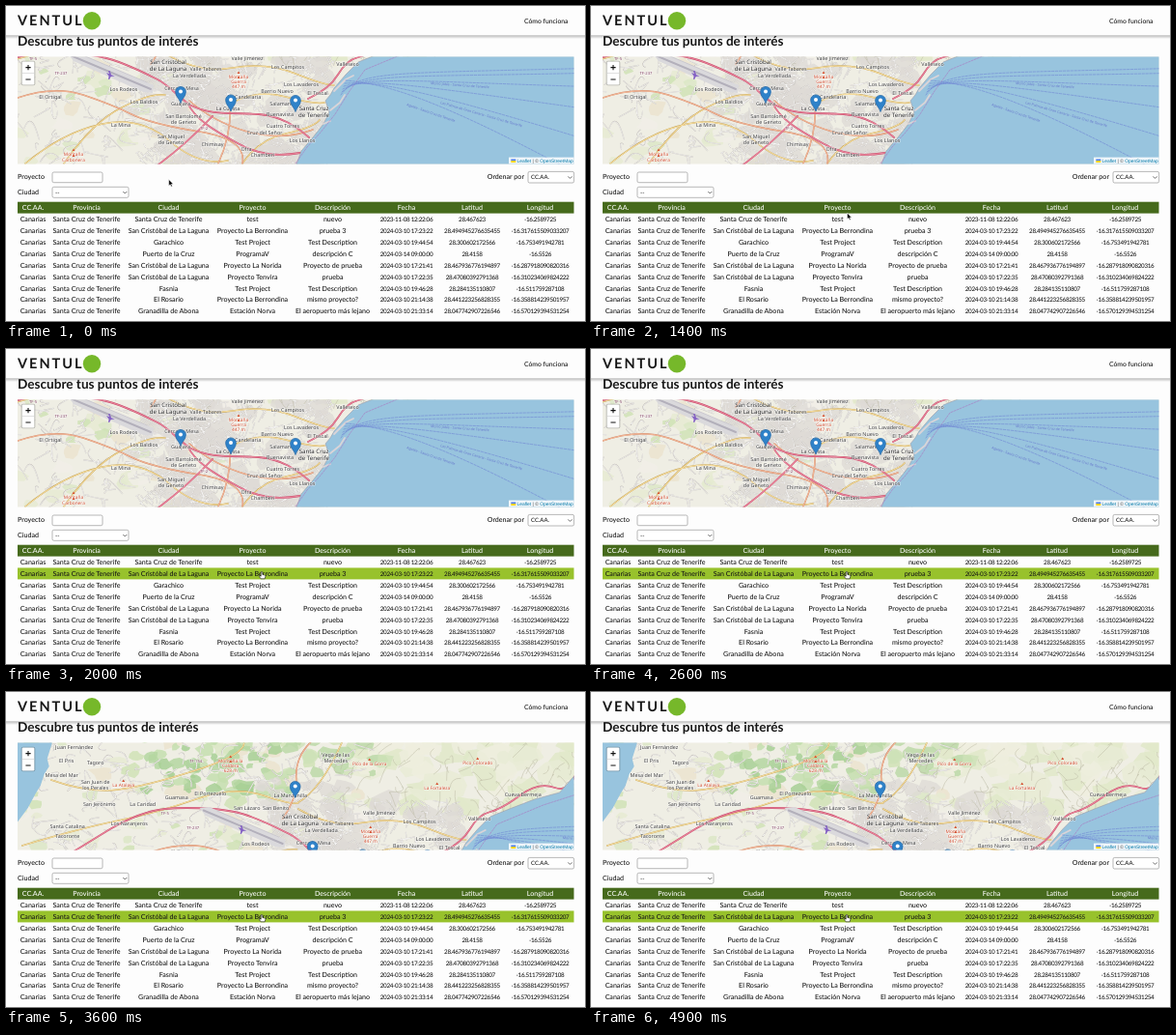
Animation of 600x326 px, one loop 5000 ms. Source, as an HTML page:

```html
<!DOCTYPE html>
<html lang="es">
<head>
<meta charset="utf-8">
<title>Puntos de interés</title>
<style>
html, body { margin: 0; width: 100%; height: 100%; overflow: hidden; background: #fdfdfd; }
svg { display: block; width: 600px; height: 326px; font: 500 7.1px Lato, sans-serif; fill: #161616; text-rendering: geometricPrecision; }
.mid { text-anchor: middle; }
.num { font-size: 6.3px; letter-spacing: -.32px; }
.place { font: 400 5.4px "Noto Sans", sans-serif; text-anchor: middle; fill: #3c3c3c; stroke: #fff; stroke-width: 1.1px; stroke-opacity: .65; paint-order: stroke; }
.town { font-size: 6.1px; fill: #222; }
.peak { font-size: 4.8px; fill: #cf4a2c; }
.ref { font-size: 4.2px; fill: #804060; }
.ferry { font: 3.6px "Noto Sans", sans-serif; fill: #6676cc; }
.line { fill: none; stroke-linecap: round; stroke-linejoin: round; }
.box { fill: #fff; stroke: #888; stroke-width: .6; }
.chev { fill: none; stroke: #333; stroke-width: .7; }
</style>
</head>
<body>
<svg viewBox="0 0 600 326">
  <defs>
    <clipPath id="frame"><rect x="12" y="52.5" width="576.5" height="111"/></clipPath>
    <linearGradient id="shade" x2="0" y2="1">
      <stop stop-color="#000" stop-opacity=".3"/><stop offset="1" stop-color="#000" stop-opacity="0"/>
    </linearGradient>
    <g id="pin">
      <path d="M0 9.5C-1.2 5-5.4 2.6-5.4-2.2A5.4 5.4 0 0 1 5.4-2.2C5.4 2.6 1.2 5 0 9.5Z" fill="#2f82c9" stroke="#2468a5" stroke-width=".7"/>
      <circle cy="-2.4" r="2" fill="#fff"/>
    </g>
  </defs>

  <text x="12" y="41.3" font-size="13.6" font-weight="700">Descubre tus puntos de interés</text>
  <rect y="30" width="600" height="4" fill="url(#shade)"/>
  <rect width="600" height="30.3" fill="#fdfdfd"/>
  <text x="12" y="20.4" font-size="14.5" font-weight="700" letter-spacing="2">VENTUL</text>
  <circle cx="89" cy="15.3" r="9.2" fill="#76b82a"/>
  <text x="537" y="17.6" font-size="6.8">Cómo funciona</text>

  <g clip-path="url(#frame)">
    <g id="map"></g>
    <rect x="15.7" y="56.7" width="14.6" height="25.6" rx="2" fill="#000" opacity=".25"/>
    <rect x="16.6" y="57.6" width="12.8" height="23.8" rx="1.2" fill="#fff"/>
    <path d="M16.6 69.5h12.8" stroke="#ccc" stroke-width=".6"/>
    <path d="M20.4 63.6h5.2M23 61v5.2M20.4 76h5.2" stroke="#111" stroke-width="1.1"/>
    <rect x="521" y="156.6" width="68" height="7" fill="#fff" opacity=".85"/>
    <path d="M523.3 158.6h5v1.7h-5z" fill="#4c7be1"/><path d="M523.3 160.3h5v1.7h-5z" fill="#ffd500"/>
    <text y="162" font-size="4.9" font-family="Liberation Sans, sans-serif" fill="#0078a8"><tspan x="529.5">Leaflet</tspan><tspan fill="#444"> | © </tspan><tspan>OpenStreetMap</tspan></text>
  </g>

  <text x="12" y="179.4">Proyecto</text>
  <rect class="box" x="48" y="172" width="52" height="10.7" rx="1.6"/>
  <text x="12" y="195">Ciudad</text>
  <rect class="box" x="48" y="187.3" width="79" height="11" rx="1.6"/>
  <text x="51" y="194.8" font-size="6">--</text>
  <path class="chev" d="M121.3 192l2 2 2-2"/>
  <text x="537" y="179.4" text-anchor="end">Ordenar por</text>
  <rect class="box" x="541" y="171.4" width="47.6" height="11.6" rx="1.6"/>
  <text x="544" y="179.4" font-size="6">CC.AA.</text>
  <path class="chev" d="M582.5 176.4l2 2 2-2"/>

  <rect id="hover" x="12" width="576.5" height="11.95" fill="#98c22c"/>
  <rect x="12" y="202.7" width="576.5" height="11.9" fill="#466a1c"/>
  <g id="table" class="mid"></g>

  <path id="arrow" d="M0 0V6.4L1.5 5.1 2.5 7.3 3.6 6.8 2.6 4.7H4.6Z" fill="#000" stroke="#fff" stroke-width=".5"/>
  <path id="hand" d="M-.8 0Q0-1 .8 0V2.6L3.4 3.3Q4 3.6 3.8 4.6L3.2 7H-.9L-2.8 4.4Q-2.6 3.4-.8 4.4Z" fill="#fff" stroke="#111" stroke-width=".6"/>
</svg>
<script>
const NS = 'http://www.w3.org/2000/svg';
const $ = id => document.getElementById(id);

function add(parent, tag, attrs, text) {
  const el = document.createElementNS(NS, tag);
  for (const k in attrs) el.setAttribute(k, attrs[k]);
  if (text) el.textContent = text;
  return parent.appendChild(el);
}

let seed = 41;
function rand(lo = 0, hi = 1) {
  seed = (seed * 16807) % 2147483647;
  return lo + (hi - lo) * seed / 2147483647;
}

const map = $('map');
const stroke = (d, color, width, more) =>
  add(map, 'path', { d, class: 'line', stroke: color, 'stroke-width': width, ...more });
const fill = (d, color, opacity = 1) => add(map, 'path', { d, fill: color, opacity });

// Irregular patch around a centre
function blob(x, y, r) {
  let d = '';
  for (let i = 0; i < 9; i++) {
    const a = i * Math.PI * 2 / 9, q = r * rand(.6, 1.25);
    d += (i ? 'L' : 'M') + (x + q * 1.4 * Math.cos(a)).toFixed(1) + ' ' + (y + q * Math.sin(a)).toFixed(1);
  }
  return d + 'Z';
}

// Scatter patches over the box x0..x1, y0..y1
function scatter(count, [x0, x1, y0, y1], [r0, r1], colors, opacity) {
  for (let i = 0; i < count; i++) {
    fill(blob(rand(x0, x1), rand(y0, y1), rand(r0, r1)), colors[i % colors.length], opacity);
  }
}

function drawLand() {
  add(map, 'rect', { x: -140, y: -30, width: 760, height: 220, fill: '#efeee4' });
  scatter(130, [-130, 230, -25, 170], [3, 10], ['#dbe8c6', '#e6ecd2', '#ece4cf', '#cfe3b4', '#f2efe9'], .8);
  scatter(60, [215, 450, -25, 60], [6, 16], ['#e9edd6', '#efefdf', '#e0e9c8'], .8);
  scatter(60, [5, 150, -25, 34], [2, 8], ['#b5d8a2', '#c6e0b0', '#a9d196'], .85);
  scatter(22, [150, 270, -25, 15], [3, 9], ['#b9d9a6', '#cfe3b8'], .8);
  scatter(75, [130, 335, 42, 168], [5, 13], ['#dedad6'], .75);
  scatter(22, [125, 215, 20, 75], [4, 10], ['#dedad6'], .75);
}

function drawStreets() {
  let minor = '', town = '', paths = '';
  for (let i = 0; i < 300; i++) {
    const x = rand(-110, 230), y = rand(-25, 168), a = rand(0, 6.28), l = rand(6, 20);
    minor += `M${x} ${y}q${l * Math.cos(a)} ${l * Math.sin(a)} ${rand(-14, 22)} ${rand(-10, 14)}`;
  }
  for (let i = 0; i < 520; i++) {
    const x = rand(135, 335), y = rand(40, 166), l = rand(3, 13);
    const a = .5 + Math.sin(x / 37 + y / 29) + (i % 2) * 1.57;
    town += `M${x} ${y}l${l * Math.cos(a)} ${l * Math.sin(a)}`;
  }
  for (let i = 0; i < 90; i++) {
    paths += `M${rand(200, 450)} ${rand(-25, 60)}q${rand(-12, 12)} ${rand(-9, 9)} ${rand(-14, 14)} ${rand(4, 18)}`;
  }
  stroke(minor + town, '#bdb8b2', 1.1);
  stroke(minor + town, '#fff', .65);
  stroke(paths, '#b5b39c', .45);

  const yellow = 'M-120 88Q-60 70-20 62T60 40 130 36 166 44M20 163Q60 130 100 122T170 140 230 160M60 163Q90 120 120 105T165 92M165 44Q190 30 212-20M166 50Q200 70 235 64T300 70 340 82M-90 20Q-50 34-20 30T60 10 110-18M235 100Q260 86 290 94T330 100M245 163Q262 138 290 132T325 118';
  stroke(yellow, '#c8a860', 1.5);
  stroke(yellow, '#f8dfa0', 1);
  const main = 'M12 95Q50 82 80 92T130 112 200 130 245 163M150 60Q165 40 164 18T180-20M190 98Q215 120 250 130T318 128M220 163Q235 130 232 96';
  stroke(main, '#d08a6a', 1.5);
  stroke(main, '#f5b99a', 1);
  const fast = 'M-140 128Q-90 108-60 90L-29 71C-10 60 8 52 28 50S80 49 100 53 145 70 157 76 176 92 190 102C212 114 238 110 262 112C285 114 300 124 314 136M188 100C196 118 218 130 240 142S280 156 305 152M150 170Q185 145 214 114M313 96Q335 86 344 71T365 53 396 36 432 28 456 6';
  stroke(fast, '#c9496a', 1.8);
  stroke(fast, '#e8859b', 1.1);
}

function drawAirport() {
  fill('M64 49L74 48L153 82L152 90L142 89L70 57Z', '#dad9dc');
  stroke('M68 51.5L150 86', '#b3b0bb', 1.9);
  stroke('M82 52L146 79', '#c5c2ca', .7);
  fill('M104 69l3 1.2-1-3.2 1.6 0 1.5 4.2 3.6 1.4-4 .4-1.5 3-1.2-.2.6-3.4z', '#8461c4');
}

function drawSea() {
  const coast = 'M620-70L475 0L452 16L437 33L411 40L385 50L365 58L352 71L340 85L336 92L331 98L335 110L329 122L318 136L306 150L297 175';
  fill(coast + 'L620 175Z', '#98c4de');
  stroke(coast, '#9a9aa8', .6);
  fill('M-88-30L-89-18L-94-2L-92 6L-97 14L-101 26L-106 34L-114 49L-125 64L-145 76V-30Z', '#98c4de');
  stroke('M340 88L352 76L360 72M336 108L346 100L351 92M329 122L336 119', '#d9d4d8', 1.8);
  stroke('M300 163L312 146L325 132L341 112L356 88L372 66L420 46L470 30', '#a682c4', .7, { 'stroke-dasharray': '2 1.3' });

  let routes = '';
  for (let i = 0; i < 6; i++) {
    routes += `M${347 + i} ${92 - i * 3}C${366 + i * 5} ${66 + i * 3} ${400 + i * 8} ${70 + i * 4} 620 ${64 + i * i * 5}`;
  }
  stroke(routes, '#7189d4', .65, { 'stroke-dasharray': '2.4 1.5' });
  const ferry = (x, y, a, s) => add(map, 'text', { x, y, class: 'ferry', transform: `rotate(${a} ${x} ${y})` }, s);
  ferry(450, 101, 16, 'Las Palmas de Gran Canaria - Santa Cruz de Tenerife');
  ferry(415, 103, 19, 'Agaete - Santa Cruz de Tenerife');
  ferry(440, 81, 4, 'Morro Jable - Santa Cruz de Tenerife');
}

const places = [
  [250, 56, 'Valle Jiménez'], [207, 67, 'Valle Tabares'], [190, 74, 'La Verdellada'], [292, 65, 'Los Campitos'],
  [354, 62, 'Valleseco'], [182, 87, 'Cercado Mesa'], [181, 103, 'Guajara'], [230, 108, 'La Cuesta'],
  [247, 96, 'La Candelaria'], [281, 90, 'Barrio Nuevo'], [306, 83, 'Los Lavaderos'], [323, 92, 'El Toscal'],
  [287, 103, 'Salamanca'], [284, 114, 'Buenavista'], [122, 88, 'Los Rodeos'], [46, 96, 'El Ortigal'],
  [143, 101, 'Los Baldíos'], [119, 125, 'La Mina'], [184, 116, 'San Bartolomé'], [184, 122, 'de Geneto'],
  [171, 137, 'San Miguel'], [171, 143, 'de Geneto'], [214, 145, 'Chimisay'], [266, 156, 'Chamberí'],
  [268, 133, 'Cruz del Señor'], [287, 126, 'Cuatro Torres'], [307, 141, 'Los Llanos'], [249, 150, 'Ofra'],
  [5, 47, 'La Caridad'], [-9, 67, 'Los Naranjeros'], [40, 40, 'Guamasa'], [113, 51, 'San Lázaro'],
  [143, 51, 'San Benito'], [158, 38, 'La Manzanilla'], [205, -4, 'Vega de las'], [205, 2, 'Mercedes'],
  [-66, -12, 'Juan Fernández'], [-44, 4, 'Tagoro'], [-44, 24, 'San Juan de'], [-44, 30, 'los Perales'],
  [-40, 47, 'San Jerónimo'], [-73, 70, 'Santa Catalina'], [-73, 80, 'Tacoronte'], [399, 37, 'Cueva Bermeja'],
  [-74, 2, 'El Pris'], [-79, 17, 'Mesa del Mar'], [75, 36, 'El Portezuelo']
];
const peaks = [
  [241, 75, 'Montaña'], [241, 80, 'Guerra'], [241, 85, '447 m'], [70, 155, 'Montaña'], [70, 161, 'Carbonera'],
  [96, 2, 'Montaña la'], [96, 7, 'Caldera'], [96, 12, '628 m'], [-15, 27, 'La Atalaya'],
  [240, 5, 'Pico de la Gorra'], [352, 4, 'Pico Colorado'], [310, 30, 'La Fortaleza']
];

function drawLabels() {
  const label = kind => ([x, y, s]) => add(map, 'text', { x, y, class: 'place ' + kind }, s);
  places.forEach(label(''));
  peaks.forEach(p => {
    label('peak')(p);
    if (!/\d/.test(p[2])) fill(`M${p[0] - 1.5} ${p[1] - 5}h3l-1.5-2.6z`, '#d65333');
  });
  [[168, 60, 'San Cristóbal'], [168, 67, 'de La Laguna'], [319, 108, 'Santa Cruz'], [319, 115, 'de Tenerife']].forEach(label('town'));
  [[57, 71, 'TF-237'], [28, 56, 'TF-5'], [205, 128, 'TF-2'], [60, 2, 'TF-154']].forEach(label('ref'));
}

function drawTable() {
  const cols = [28, 83.5, 168.5, 255.5, 338.5, 415, 483, 553.5];
  const lagoon = 'San Cristóbal de La Laguna';
  const rows = [
    ['Santa Cruz de Tenerife', 'test', 'nuevo', '2023-11-08 12:22:06', '28.467623', '-16.2589725'],
    [lagoon, 'Proyecto La Berrondina', 'prueba 3', '2024-03-10 17:23:22', '28.494945276635455', '-16.317615509033207'],
    ['Garachico', 'Test Project', 'Test Description', '2024-03-10 19:44:54', '28.300602172566', '-16.753491942781'],
    ['Puerto de la Cruz', 'ProgramaV', 'descripción C', '2024-03-14 09:00:00', '28.4158', '-16.5526'],
    [lagoon, 'Proyecto La Norida', 'Proyecto de prueba', '2024-03-10 17:21:41', '28.467936776194897', '-16.287918090820316'],
    [lagoon, 'Proyecto Tenvira', 'prueba', '2024-03-10 17:22:35', '28.47080392791368', '-16.310234069824222'],
    ['Fasnia', 'Test Project', 'Test Description', '2024-03-10 19:46:28', '28.284135110807', '-16.511759287108'],
    ['El Rosario', 'Proyecto La Berrondina', 'mismo proyecto?', '2024-03-10 21:14:38', '28.441223256828355', '-16.358814239501957'],
    ['Granadilla de Abona', 'Estación Norva', 'El aeropuerto más lejano', '2024-03-10 21:33:14', '28.047742907226546', '-16.570129394531254']
  ];
  const cell = (x, y, s, more) => add($('table'), 'text', { x, y, ...more }, s);
  ['CC.AA.', 'Provincia', 'Ciudad', 'Proyecto', 'Descripción', 'Fecha', 'Latitud', 'Longitud']
    .forEach((s, i) => cell(cols[i], 211.2, s, { fill: '#fff' }));
  rows.forEach((row, r) => ['Canarias', 'Santa Cruz de Tenerife', ...row].forEach((s, i) =>
    cell(cols[i], 222.8 + r * ROW, s, i > 4 ? { class: 'num' } : {})));
}

const ROW = 11.95, TOP = 214.5;
drawLand();
drawStreets();
drawAirport();
drawSea();
drawLabels();
for (const [x, y] of [[163, 29], [181, 91], [233, 99.5], [300, 100]]) {
  add(map, 'use', { href: '#pin', x, y });
}
// Tiles west of the first view are still blank when the pan begins
const blank = add(map, 'rect', { x: -140, y: -30, width: 133, height: 220, fill: '#ddd' });
drawTable();

const span = (t, a, b) => Math.min(1, Math.max(0, (t - a) / (b - a)));
const smooth = p => p * p * (3 - 2 * p);

function render(now) {
  const t = Math.floor((now % 5000) / 100) * 100;
  const a = smooth(span(t, 200, 1400)), b = smooth(span(t, 1400, 1900));
  const x = 168.7 + 96.8 * a - .5 * b;
  const y = 179.6 + 34.6 * a + 16.6 * b;
  const row = Math.floor((y - TOP) / ROW), over = row >= 0;

  for (const [id, on] of [['arrow', !over], ['hand', over]]) {
    $(id).setAttribute('transform', `translate(${x} ${y})`);
    $(id).setAttribute('visibility', on ? 'visible' : 'hidden');
  }
  $('hover').setAttribute('y', TOP + Math.max(0, row) * ROW);
  $('hover').setAttribute('visibility', over ? 'visible' : 'hidden');

  const pan = 1 - (1 - span(t, 3280, 3530)) ** 4;
  map.setAttribute('transform', `translate(${136.7 * pan} ${71 * pan})`);
  blank.setAttribute('visibility', t < 3400 ? 'visible' : 'hidden');
}

const start = performance.now();
function loop() {
  render(performance.now() - start);
  requestAnimationFrame(loop);
}
loop();
</script>
</body>
</html>
```
